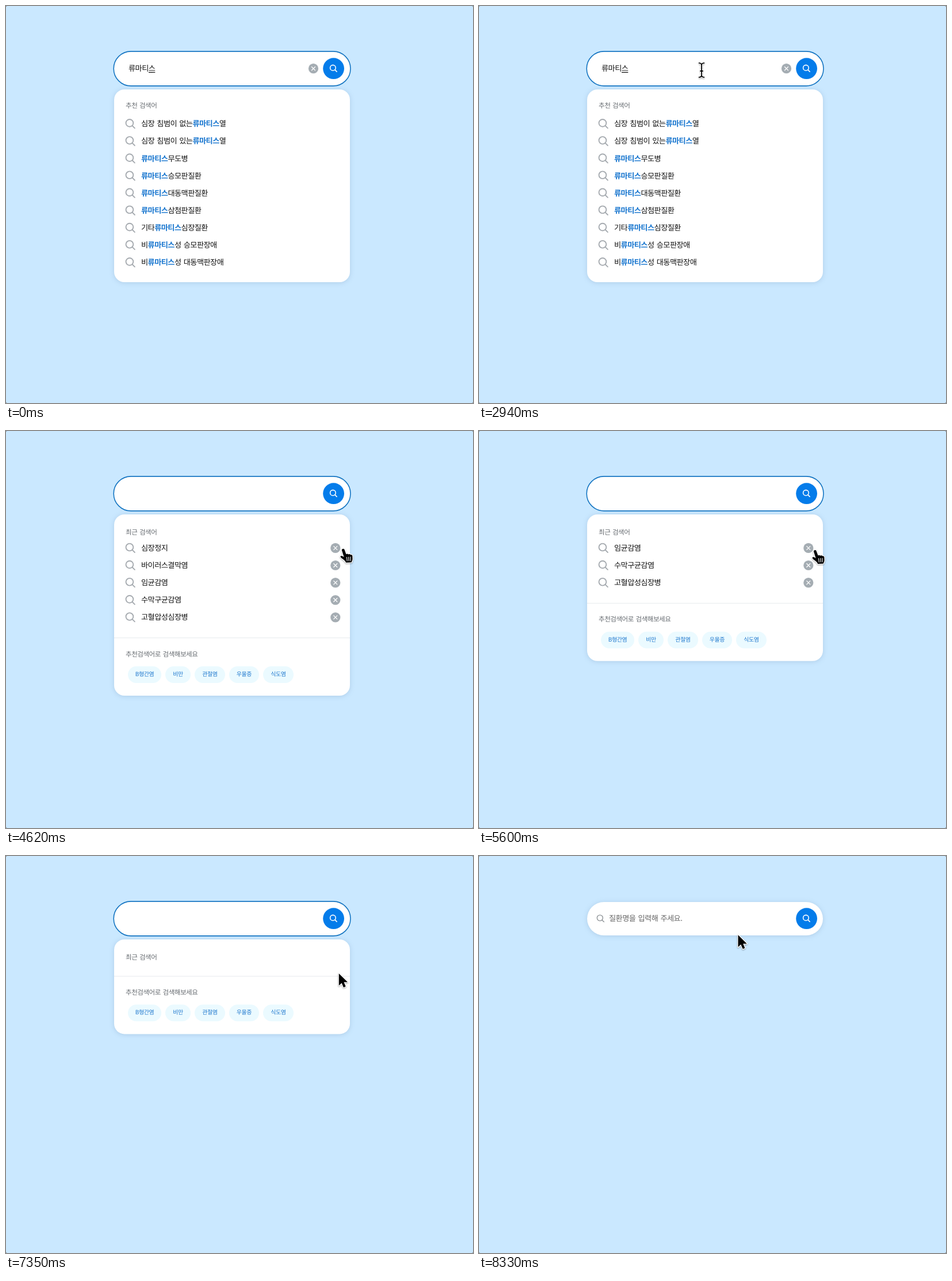
These frames come from a looping animation (812 by 690 pixels, 8400 ms). An HTML page:

```html
<!DOCTYPE html>
<html lang="ko">
<head>
<meta charset="utf-8">
<title>질환 검색</title>
<style>
  html, body { margin: 0; width: 100%; height: 100%; overflow: hidden; background: #5b6670; }
  svg { display: block; width: 812px; height: 690px; background: #cae8ff; border-radius: 2px; }
  text {
    font-family: "Noto Sans CJK KR", "Noto Sans CJK", "Noto Sans", sans-serif;
    font-size: 13.2px; letter-spacing: -.041em; word-spacing: .075em;
    text-rendering: geometricPrecision; fill: #111; white-space: pre;
  }
  .item { font-weight: 500; }
  .key { font-weight: 700; fill: #1876cf; }
  .head { font-size: 11.55px; fill: #666b70; }
  .hint { fill: #666; }
  .chip { font-size: 9.98px; font-weight: 500; fill: #1d77cd; text-anchor: middle; }
  .card { fill: #fff; filter: drop-shadow(0 1px 4px rgba(40, 80, 120, .17)); }
  .lens { fill: none; stroke-linecap: round; }
  #cursor { filter: drop-shadow(0 1.2px 1.2px rgba(0, 0, 0, .35)); }
  .solid { fill: #000; stroke: #fff; stroke-width: 2.6; stroke-linejoin: round; paint-order: stroke; }
</style>
</head>
<body>
<svg viewBox="0 0 812 690">
  <g id="panel">
    <rect id="card" class="card" x="188" y="145" width="410" rx="18"/>
    <g id="suggest"></g>
    <g id="recent">
      <g id="rows"></g>
      <g id="foot"></g>
    </g>
  </g>
  <g id="idle">
    <rect class="card" x="188" y="80" width="410" height="58" rx="29"/>
  </g>
  <rect id="focus" x="187.2" y="78.9" width="411.8" height="60" rx="30" fill="#fff" stroke="#1575c2" stroke-width="1.6"/>
  <g id="typed">
    <path d="M248 115.3h11.3" stroke="#111" stroke-width="1.2"/>
    <path id="caret" d="M259.2 100v16" stroke="#111" stroke-width="1.3"/>
  </g>
  <circle cx="569.6" cy="108.7" r="18.4" fill="#047cea"/>
  <g id="button"></g>
  <g id="cursor">
    <path id="arrow" class="solid" d="M0 0V21L4.8 16.5 8.2 24.2 11.9 22.6 8.7 15.1H15.3Z"/>
    <g id="hand">
      <path class="solid" d="M-1.6 2C-2.2-.6 2-1.6 3 1L6 9C7 8 9 8 9.8 9.3 11 8.4 13 8.7 13.6 10 15 9.4 16.6 10.3 16.8 12L17 17C17 20 15.5 21 15.3 23L5.5 23.5C5 20.5 1.5 18.5-1 16.5-3 15-4.5 13.5-3.8 12.2-3 11-.5 11.6 2.2 14Z"/>
      <path d="M7 14l.7 6.5M10.2 13.8l.5 6.5M13.4 13.6l.2 6.5" stroke="#fff" stroke-width="1.1" stroke-linecap="round"/>
    </g>
    <g id="beam" fill="none"></g>
  </g>
  <circle id="ring" r="49.3" fill="none" stroke="#000" stroke-width="1.3"/>
</svg>
<script>
const $ = id => document.getElementById(id);
const LOOP = 8400, FRAME = 70, STEP = 30.12;

const label = (x, cy, size, cls, body) =>
  `<text class="${cls}" x="${x}" y="${cy + size * .37}">${body}</text>`;
const item = (cy, body) => label(235, cy, 13.2, 'item', body);
const head = (cy, body) => label(208, cy, 11.55, 'head', body);
const lens = (x, y, r, color, width) =>
  `<g class="lens" stroke="${color}" stroke-width="${width}"><circle cx="${x}" cy="${y}" r="${r}"/>` +
  `<path d="M${x + r * .72} ${y + r * .72}l${r * .68} ${r * .68}"/></g>`;
const rowLens = cy => lens(214.9, cy - 1.4, 6.4, '#a6abb0', 1.9);
const cross = (x, y) =>
  `<circle cx="${x}" cy="${y}" r="8.6" fill="#a5adb3"/>` +
  `<path d="M${x - 3} ${y - 3}l6 6m0-6l-6 6" stroke="#fff" stroke-width="1.3" stroke-linecap="round"/>`;

const word = '류마티스';
const suggestions = ['심장 침범이 없는*열', '심장 침범이 있는*열', '*무도병', '*승모판질환',
  '*대동맥판질환', '*삼첨판질환', '기타*심장질환', '비*성 승모판장애', '비*성 대동맥판장애'];
const history = ['심장정지', '바이러스결막염', '임균감염', '수막구균감염', '고혈압성심장병'];
const chips = [['B형간염', 212, 58], ['비만', 277, 44], ['관절염', 328, 53], ['우울증', 388, 52], ['식도염', 447, 53]];

$('suggest').innerHTML = head(172.3, '추천 검색어') + suggestions.map((s, i) => {
  const y = 204.4 + i * STEP;
  return rowLens(y + .4) + item(y, s.replace('*', `<tspan class="key">${word}</tspan>`));
}).join('');

$('foot').innerHTML = '<path d="M188 209h410" stroke="#e6eaed"/>' + head(236.8, '추천검색어로 검색해보세요') +
  chips.map(([name, x, w]) =>
    `<rect x="${x}" y="258.3" width="${w}" height="29" rx="14.5" fill="#ebfaff"/>` +
    label(x + w / 2, 271.8, 9.98, 'chip', name)).join('');

$('typed').insertAdjacentHTML('beforeend', label(213, 108.2, 13.2, '', word) + cross(534.5, 108.7));
$('idle').insertAdjacentHTML('beforeend',
  lens(210.3, 107.6, 5, '#8f9498', 1.4) + label(226, 108.2, 13.2, 'hint', '질환명을 입력해 주세요.'));
$('button').innerHTML = lens(568.4, 107.4, 4.8, '#fff', 1.6);

const beam = 'M-5-12.3C-2-12.3 0-11.4 0-9V9C0 11.4-2 12.3-5 12.3M5-12.3C2-12.3 0-11.4 0-9M5 12.3C2 12.3 0 11.4 0 9M-2.6 1.5H2.6';
$('beam').innerHTML = `<path d="${beam}" stroke="#fff" stroke-width="3.8"/><path d="${beam}" stroke="#000" stroke-width="1.8"/>`;

// Pointer: time, shape, x, y
const pointer = [
  [0, '', 387, 111.5], [420, 'beam', 387, 110.3], [490, 'beam', 387, 112.6], [560, 'beam', 387, 112],
  [910, 'beam', 387, 112], [980, 'beam', 387, 111.5], [2940, 'beam', 387, 111.5],
  [3010, 'beam', 408, 112], [3080, 'beam', 463, 114], [3150, 'beam', 518, 116], [3220, 'hand', 540.5, 117.5],
  [3430, 'hand', 540.5, 117], [3500, 'hand', 540.5, 114.5], [3990, 'hand', 540.5, 114.5],
  [4060, 'beam', 540, 115.8], [4340, 'beam', 540, 115.8], [4410, 'beam', 545, 124],
  [4480, 'arrow', 560, 154], [4550, 'arrow', 579, 191], [4620, 'hand', 585.5, 205.3],
  [4760, 'hand', 586, 206], [5040, 'hand', 586, 206], [5110, 'hand', 583.6, 207.5],
  [7070, 'hand', 583.4, 207.5], [7140, 'arrow', 578.8, 204.2], [7350, 'arrow', 578.8, 204.2],
  [7420, 'arrow', 606, 219], [7490, 'arrow', 645, 238], [7560, 'arrow', 667, 247],
  [7910, 'arrow', 667, 247], [7980, 'arrow', 657, 242], [8050, 'arrow', 618, 222],
  [8120, 'arrow', 558, 191], [8190, 'arrow', 498, 161], [8260, 'arrow', 462, 143], [8330, 'arrow', 450.5, 137.3],
  [LOOP, '', 450.5, 137.3]
];
// Clicks: start, end, x, y
const clicks = [
  [3850, 3990, 532, 106], [4900, 5040, 575, 198.8], [5460, 5600, 574.5, 198.8], [5950, 6090, 574, 198.8],
  [6440, 6580, 574, 198.8], [6930, 7070, 574, 198.8], [7770, 7840, 652, 233]
];
const blinks = [350, 840, 1400, 1890, 2450, 2940, 3430];
const CLEARED = 3990, CLOSED = 7840;
const removals = [5040, 5600, 6090, 6580, 7070];

const passed = (list, t) => list.filter(v => v <= t).length;
const show = (id, on) => $(id).style.display = on ? '' : 'none';
let rowsShown = -1;

function setRows(n) {
  if (n === rowsShown) return;
  rowsShown = n;
  $('rows').innerHTML = head(175.5, '최근 검색어') + history.slice(5 - n).map((name, i) => {
    const y = 203 + i * STEP;
    return rowLens(y + .4) + item(y - .3, name) + cross(572.8, y + .4);
  }).join('');
  $('foot').setAttribute('transform', `translate(0 ${n * STEP})`);
}

function setPointer(t) {
  const i = pointer.findIndex(k => k[0] > t) - 1;
  const [t0, kind, x0, y0] = pointer[i], [t1, , x1, y1] = pointer[i + 1];
  const p = (t - t0) / (t1 - t0);
  for (const id of ['arrow', 'hand', 'beam']) show(id, id === kind);
  $('cursor').setAttribute('transform', `translate(${x0 + (x1 - x0) * p} ${y0 + (y1 - y0) * p})`);
}

function draw(t) {
  const typing = t < CLEARED, open = t < CLOSED, rows = 5 - passed(removals, t);
  show('panel', open);
  show('focus', open);
  show('idle', !open);
  show('typed', typing);
  show('suggest', typing);
  show('recent', !typing);
  show('caret', passed(blinks, t) % 2);
  setRows(rows);
  $('card').setAttribute('height', typing ? 335 : 164.4 + rows * STEP);
  setPointer(t);
  const click = clicks.find(c => t >= c[0] && t < c[1]);
  show('ring', click);
  if (click) {
    $('ring').setAttribute('cx', click[2]);
    $('ring').setAttribute('cy', click[3]);
  }
}

const start = performance.now();
function tick() {
  const t = (performance.now() - start) % LOOP;
  draw(Math.floor(t / FRAME) * FRAME);
  requestAnimationFrame(tick);
}
tick();
</script>
</body>
</html>
```
